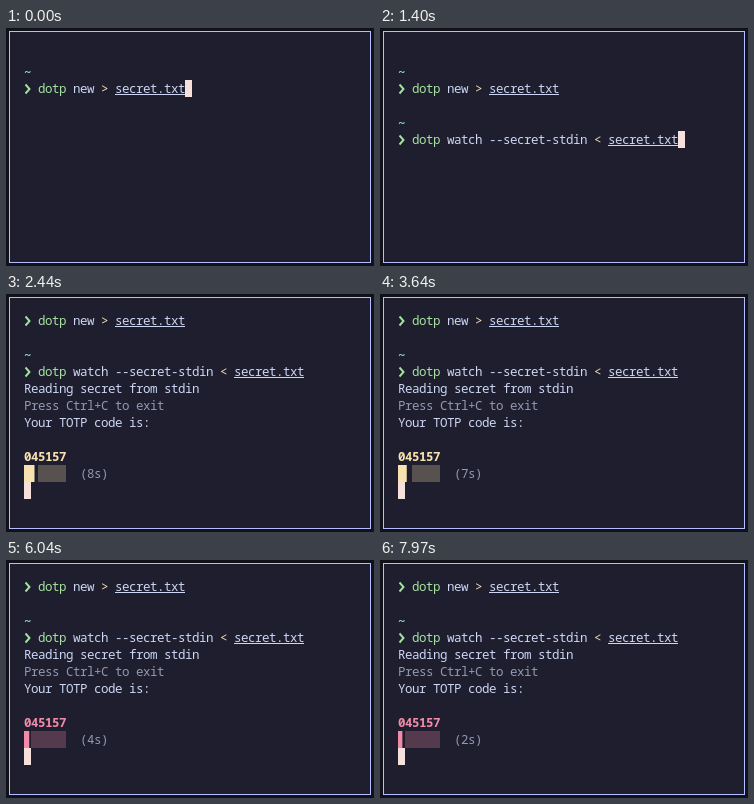
Recreate the animation shown at these times as an HTML page. Size 368 by 238 pixels, loop 8000 ms.

```html
<!DOCTYPE html>
<html lang="en">
<head>
<meta charset="utf-8">
<title>Terminal</title>
<style>
  html, body { margin: 0; width: 100%; height: 100%; overflow: hidden; background: #11111b; }
  svg { display: block; width: 368px; height: 238px; }
  text {
    font: 12.5px "Noto Sans Mono", "DejaVu Sans Mono", monospace;
    letter-spacing: calc(7px - 0.6em);
    white-space: pre;
  }
  .bold { font-weight: 700; }
</style>
</head>
<body>
<svg id="stage" viewBox="0 0 368 238">
  <rect x="3.5" y="3.5" width="361" height="231" fill="#1e1e2e" stroke="#b4befe"/>
  <g id="screen"></g>
</svg>
<script>
const LOOP = 8000, CELL = 7, ROW = 17, LEFT = 18, TOP = 18;
const C = {
  text: '#cdd6f4', dim: '#9399b2', teal: '#94e2d5', green: '#a6e3a1',
  yellow: '#f9e2af', red: '#f38ba8', cursor: '#f5e0dc'
};
const screen = document.getElementById('screen');
const escapes = { '<': '&lt;', '>': '&gt;' };
const xAt = col => LEFT + col * CELL;
const yAt = row => TOP + row * ROW;

const rect = (x, y, w, h, fill, opacity = 1) =>
  `<rect x="${x}" y="${y}" width="${w}" height="${h}" fill="${fill}" fill-opacity="${opacity}"/>`;

const write = (row, col, string, fill = C.text, style = '') =>
  `<text x="${xAt(col)}" y="${yAt(row) + 13}" fill="${fill}" class="${style}">` +
  string.replace(/[<>]/g, c => escapes[c]) + '</text>';

const cursor = (row, col) => rect(xAt(col), yAt(row), CELL, ROW, C.cursor);

const chevron = row =>
  `<path d="M19.5 ${yAt(row) + 4.5}l4 4.5l-4 4.5" fill="none" stroke="${C.green}" stroke-width="1.9"/>`;

// Draws a highlighted command whose last word is an underlined path.
function command(row, args, redirect) {
  const file = 'secret.txt';
  const argsCol = 7, redirectCol = argsCol + args.length + 1, fileCol = redirectCol + 2;
  return write(row, 2, 'dotp', C.green) + write(row, argsCol, args) +
    write(row, redirectCol, redirect, C.yellow) + write(row, fileCol, file) +
    rect(xAt(fileCol), yAt(row) + 14, file.length * CELL, 1, C.text);
}
const newCommand = row => command(row, 'new', '>');
const watchCommand = row => command(row, 'watch --secret-stdin', '<');
const prompt = row => write(row - 1, 0, '~', C.teal, 'bold') + chevron(row);

function shell(t) {
  let out = prompt(2) + newCommand(2);
  if (t < 30) return out + cursor(2, 23);
  if (t < 100) return out + cursor(3, 0);
  out += prompt(5);
  if (t < 840) return out + cursor(5, 2);
  if (t < 1040) return out + newCommand(5) + cursor(5, 23);
  out += watchCommand(5);
  return out + (t < 2050 ? cursor(5, 40) : cursor(6, 0));
}

// Counts down from a value, one step per listed time.
const countdown = (t, from, times) => from - times.filter(at => t >= at).length;

function progress(row, eighths, color) {
  const started = Math.ceil(eighths / 8);
  return rect(LEFT, yAt(row), eighths * CELL / 8, ROW, color) +
    rect(xAt(started), yAt(row), (6 - started) * CELL, ROW, color, 0.26);
}

function watch(t) {
  const seconds = countdown(t, 8, [2760, 3820, 4760, 5730, 6760, 7690]);
  const eighths = countdown(t, 12, [2860, 3560, 4220, 4760, 5430, 5960, 6780]);
  const color = seconds > 5 ? C.yellow : C.red;
  return chevron(0) + newCommand(0) + prompt(3) + watchCommand(3) +
    write(4, 0, 'Reading secret from stdin') +
    write(5, 0, 'Press Ctrl+C to exit', C.dim) +
    write(6, 0, 'Your TOTP code is:') +
    write(8, 0, '045157', color, 'bold') +
    progress(9, eighths, color) +
    write(9, 8, `(${seconds}s)`, C.dim) + cursor(10, 0);
}

let shown = '';
function render(t) {
  const picture = t < 2120 ? shell(t) : watch(t);
  if (picture !== shown) screen.innerHTML = shown = picture;
}

const start = performance.now();
function tick() {
  render((performance.now() - start) % LOOP);
  requestAnimationFrame(tick);
}
tick();
</script>
</body>
</html>
```
